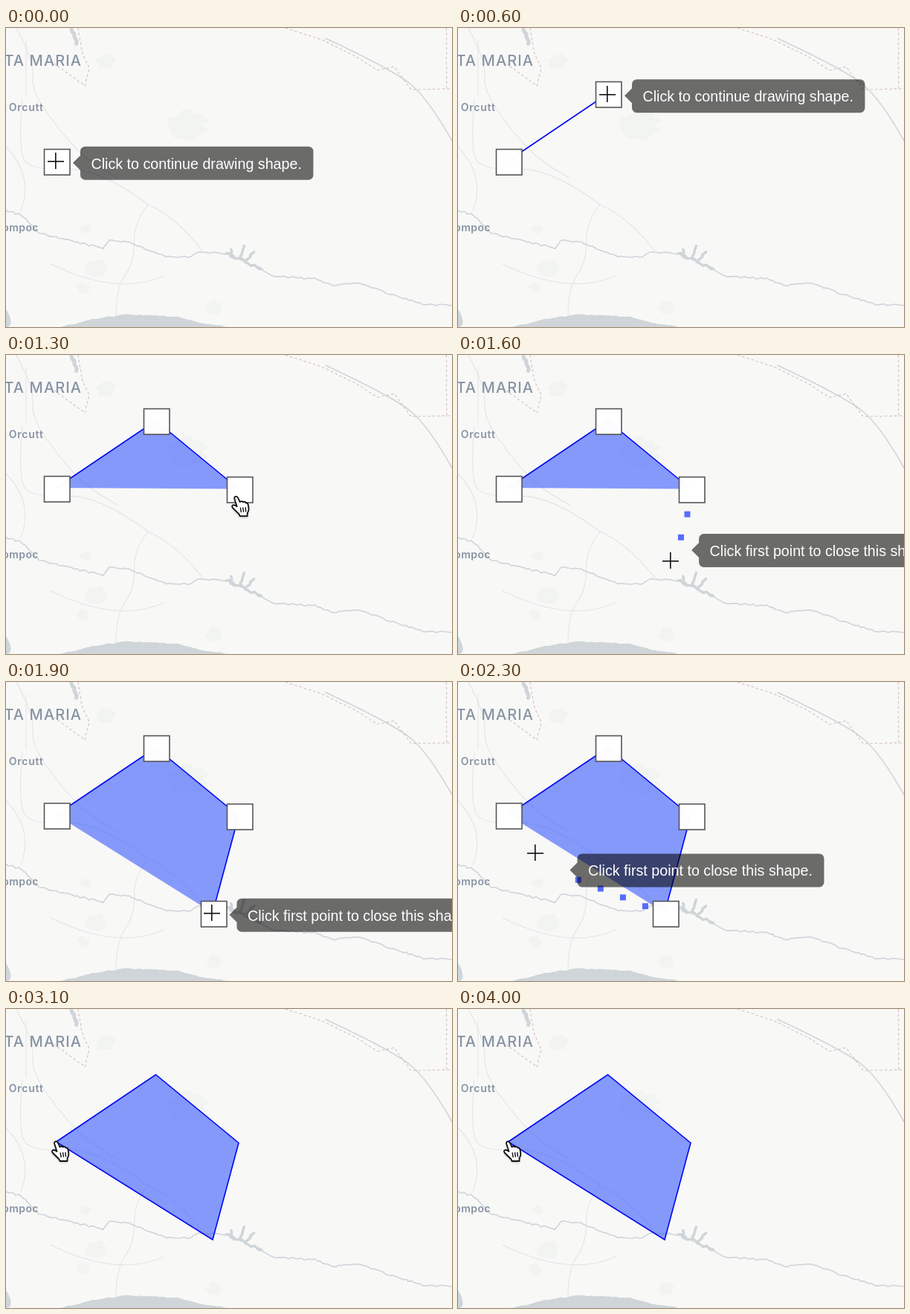
An HTML page with a canvas that plays this animation: 600 by 403 pixels, repeating every 4200 ms.

```html
<!DOCTYPE html>
<html lang="en">
<head>
<meta charset="utf-8">
<title>Drawing a polygon on a map</title>
<style>
html, body { margin: 0; width: 100%; height: 100%; overflow: hidden; background: #f8f8f7; }
canvas { display: block; width: 600px; height: 403px; }
</style>
</head>
<body>
<canvas id="stage" width="600" height="403"></canvas>
<script>
const W = 600, H = 403, LOOP = 4200, STEP = 100;
const ctx = document.getElementById('stage').getContext('2d');
const map = document.createElement('canvas');
map.width = W;
map.height = H;

const VERTS = [[67.5, 179], [201.5, 88.5], [313, 180.5], [278, 311]];
const CLICKS = [0, 600, 1200, 1900, 2600];
const BEND = [128, 288]; // the way back to the first point swings around this
const LAG = 55;          // tooltip and guide trail the pointer, in ms

const mix = (a, b, u) => a.map((v, i) => v + (b[i] - v) * u);
const ease = u => u * u * (3 - 2 * u);
const dist = (a, b) => Math.hypot(b[0] - a[0], b[1] - a[1]);

function seeded(seed) {
  return () => {
    seed = (seed * 16807) % 2147483647;
    return seed / 2147483647 - .5;
  };
}

function paintMap(c) {
  const rand = seeded(7);
  const pairs = s => s.split(' ').map(p => p.split(',').map(Number));

  // Rounded course through a few points
  function smooth(pts) {
    c.beginPath();
    c.moveTo(...pts[0]);
    for (let i = 1; i < pts.length - 1; i++) {
      const end = i === pts.length - 2 ? pts[i + 1] : mix(pts[i], pts[i + 1], .5);
      c.quadraticCurveTo(...pts[i], ...end);
    }
    if (pts.length === 2) c.lineTo(...pts[1]);
  }

  // Jagged course with random side steps
  function rough(pts, amp) {
    c.beginPath();
    c.moveTo(...pts[0]);
    for (let i = 1; i < pts.length; i++) {
      const n = Math.ceil(dist(pts[i - 1], pts[i]) / 4);
      for (let k = 1; k <= n; k++) {
        const [x, y] = mix(pts[i - 1], pts[i], k / n);
        c.lineTo(x + rand() * amp, y + rand() * amp);
      }
    }
  }

  function stroke(color, width, dash = []) {
    c.strokeStyle = color;
    c.lineWidth = width;
    c.setLineDash(dash);
    c.stroke();
  }

  function patch(x, y, r) {
    c.beginPath();
    for (let a = 0; a < Math.PI * 2; a += .3) {
      const d = r * (1 + rand() * .5);
      c.lineTo(x + Math.cos(a) * d, y + Math.sin(a) * d * .8);
    }
    c.fillStyle = '#f2f4f2';
    c.fill();
  }

  function label(text, right, y, size, weight, gap) {
    c.font = `${weight} ${size}px Inter, "Open Sans", sans-serif`;
    c.letterSpacing = gap + 'px';
    c.textAlign = 'right';
    c.fillStyle = '#8894a4';
    c.fillText(text, right + gap, y);
  }

  c.fillStyle = '#f8f8f7';
  c.fillRect(0, 0, W, H);
  c.lineJoin = c.lineCap = 'round';

  patch(245, 131, 25);
  patch(134, 45, 12);
  patch(107, 271, 8);
  patch(121, 324, 14);
  patch(105, 351, 9);
  patch(280, 377, 11);

  const roads = [
    '14,0 38,45 34,85 76,143 112,181 150,202',
    '22,96 16,165 34,192 125,188 191,238',
    '27,16 27,90',
    '0,160 38,200 20,246',
    '191,238 172,262 173,315 148,350 148,388',
    '191,238 230,255 265,301',
    '60,318 150,362 212,334'
  ];
  for (const r of roads) {
    smooth(pairs(r));
    stroke('#e3e5e5', 1.1);
  }
  smooth(pairs('430,14 520,56 568,95 600,152'));
  stroke('#d2d4d5', 1.6);

  c.lineCap = 'butt';
  for (const b of ['97,0 103,35 112,54 106,78 65,48', '376,0 425,16 470,38 500,57 522,52 545,83 600,82', '592.5,0 592.5,83']) {
    rough(pairs(b), .6);
    stroke('#d8c4c4', 1.2, [3.5, 3]);
  }
  c.lineCap = 'round';

  const water = '#cfd5d9';
  for (const r of [
    '0,246 20,252 45,276 75,284 130,297 140,285 165,289 215,308 245,309 262,302 296,304',
    '340,322 355,334 415,338 440,347 475,343 520,360 560,372 600,374'
  ]) {
    rough(pairs(r), 2.4);
    stroke(water, 1.6);
  }
  for (const arm of ['296,304 345,326', '306,310 302,297', '316,312 319,294', '323,313 332,301']) {
    rough(pairs(arm), 4);
    stroke(water, 3.5);
  }
  rough(pairs('88,2 96,22'), 3);
  stroke(water, 5);

  c.fillStyle = water;
  rough(pairs('72,403 120,392 160,386 230,389 265,398 300,403'), 1.5);
  c.fill();
  smooth(pairs('0,379 6,388 7,403 0,403'));
  c.fill();

  label('SANTA MARIA', 101, 51, 20, 500, 1.1);
  label('Orcutt', 50, 112, 14, 600, .75);
  label('Lompoc', 43.5, 274, 14, 600, .4);
}

// The pointer leaves each point on its click and rests 100 ms at the next one
function pointer(t) {
  const i = Math.max(0, CLICKS.findLastIndex(c => c <= t));
  const a = VERTS[i % 4], b = VERTS[(i + 1) % 4];
  if (i === 4) return a;
  const s = ease(Math.min(1, Math.max(0, (t - CLICKS[i]) / (CLICKS[i + 1] - STEP - CLICKS[i]))));
  const [x, y] = i === 3 ? mix(mix(a, BEND, s), mix(BEND, b, s), s) : mix(a, b, s);
  return [x - .7, y + 1];
}

function shape(pts, closed) {
  ctx.beginPath();
  pts.forEach(p => ctx.lineTo(...p));
  if (closed) ctx.closePath();
  if (pts.length > 2) {
    ctx.fillStyle = 'rgba(57,90,255,.6)';
    ctx.fill();
  }
  ctx.strokeStyle = '#0008ee';
  ctx.lineWidth = 1.6;
  ctx.stroke();
}

function marker([x, y]) {
  const box = [Math.floor(x) - 15.5, Math.floor(y) - 15.5, 34.5, 34.5];
  ctx.fillStyle = 'rgba(255,255,255,.98)';
  ctx.strokeStyle = '#555';
  ctx.lineWidth = 1.6;
  ctx.fillRect(...box);
  ctx.strokeRect(...box);
}

function guide(from, to) {
  const len = dist(from, to), gap = 32.3;
  ctx.fillStyle = 'rgba(45,75,255,.8)';
  for (let d = gap; d + 8 < len; d += gap) {
    const [x, y] = mix(from, to, d / len);
    ctx.fillRect(x, y - 1, 8, 8);
  }
}

function tooltip([x, y], text) {
  ctx.font = '19.7px "Liberation Sans", Arial, sans-serif';
  const w = ctx.measureText(text).width + 30;
  ctx.save();
  ctx.translate(x + 33.2, y - 20.3);
  ctx.fillStyle = 'rgba(0,0,0,.57)';
  ctx.beginPath();
  ctx.roundRect(0, 0, w, 45, 6.5);
  ctx.moveTo(0, 12);
  ctx.lineTo(-10, 22);
  ctx.lineTo(0, 32);
  ctx.fill();
  ctx.fillStyle = '#fff';
  ctx.fillText(text, 14.5, 29.8);
  ctx.restore();
}

function cross([x, y]) {
  x = Math.round(x);
  y = Math.round(y);
  ctx.fillStyle = '#111';
  ctx.fillRect(x - 11, y - 1, 22, 1.6);
  ctx.fillRect(x - 1, y - 12, 1.6, 22);
}

const palm = new Path2D('M-2.4 2.5Q-2.8 -.5 0 -.5Q1.5 -.5 2.4 1.5L5 7Q7.5 5 9 7Q12 5.8 13 8.2Q15.6 8 16 10.5' +
  'L16.8 16Q17 19 15 22L15 26L5 26L4 23.5L-4.6 15Q-6.6 12.4 -4.4 11.2Q-2.4 10.4 1 13Z');
const knuckles = new Path2D('M5.6 14.5L6.8 21M9 14.2L10 20.6M12.4 14L13 20.2');

function hand([x, y]) {
  ctx.save();
  ctx.translate(x, y);
  ctx.lineJoin = 'round';
  ctx.shadowColor = 'rgba(0,0,0,.35)';
  ctx.shadowBlur = 3;
  ctx.shadowOffsetY = 1.5;
  ctx.fillStyle = '#fff';
  ctx.fill(palm);
  ctx.shadowColor = 'transparent';
  ctx.strokeStyle = '#111';
  ctx.lineWidth = 1.8;
  ctx.stroke(palm);
  ctx.lineWidth = 1.4;
  ctx.stroke(knuckles);
  ctx.restore();
}

function draw(now) {
  const t = Math.floor(now % LOOP / STEP) * STEP;
  const n = CLICKS.filter(c => c <= t).length;
  const closed = n > VERTS.length;
  const pts = VERTS.slice(0, n);
  const at = pointer(t), lagged = pointer(t - LAG < 0 ? 0 : t - LAG);
  const leaving = t === CLICKS[2] + STEP; // still over the third marker
  const returned = t >= CLICKS[4] - STEP;

  ctx.drawImage(map, 0, 0);
  shape(pts, closed);
  if (!closed && !leaving) guide(pts[n - 1], lagged);
  if (!closed) pts.forEach(marker);
  if (!closed && !leaving) {
    tooltip(lagged, n < 3 ? 'Click to continue drawing shape.' : 'Click first point to close this shape.');
  }
  (leaving || returned ? hand : cross)(at);
}

paintMap(map.getContext('2d'));
const start = performance.now();
function tick() {
  draw(performance.now() - start);
  requestAnimationFrame(tick);
}
tick();
</script>
</body>
</html>
```
